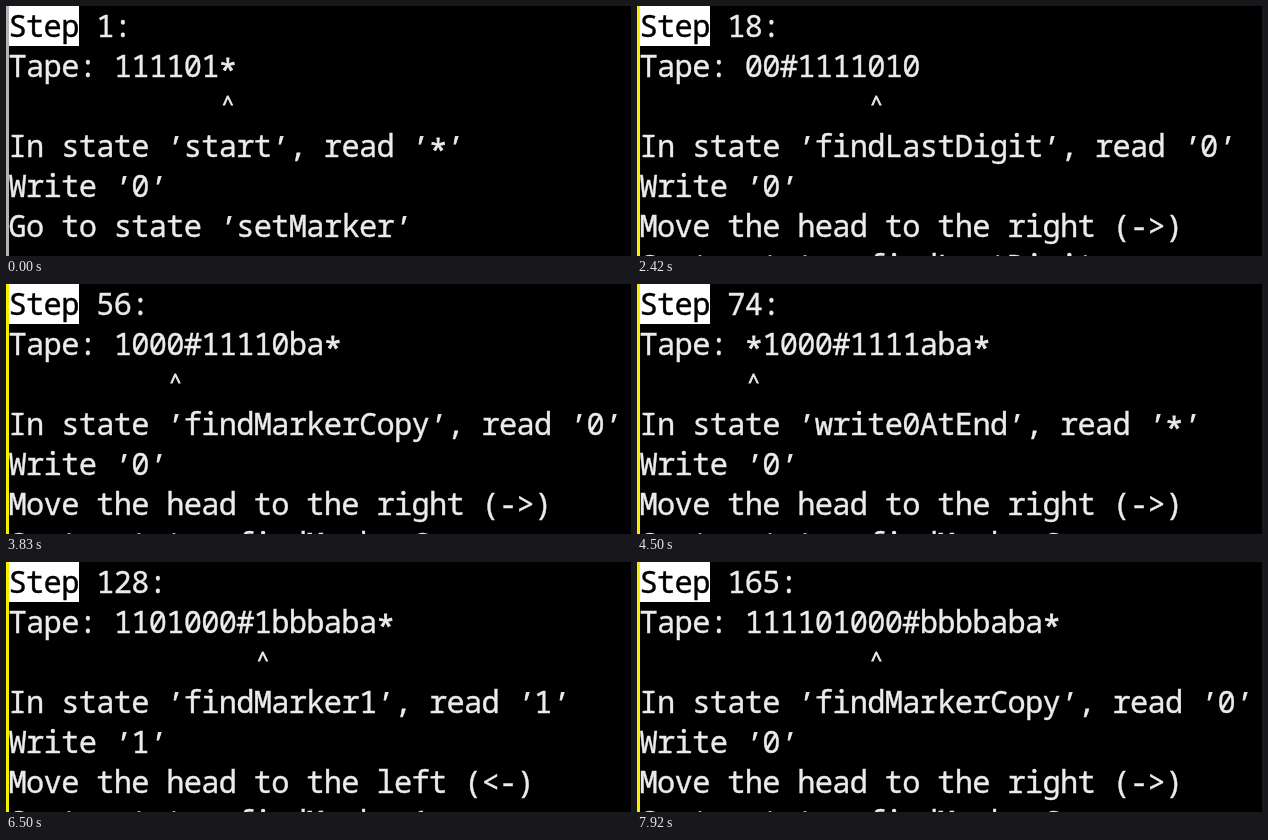
An HTML page for the animation above (8 s loop, 625 px wide and 250 px high).

```html
<!DOCTYPE html>
<html lang="en">
<head>
<meta charset="utf-8">
<title>Turing machine log</title>
<style>
  html, body { margin: 0; width: 100%; height: 100%; overflow: hidden; background: #000; }
  #screen { position: relative; width: 625px; height: 250px; overflow: hidden; background: #000; }
  #log, #caret { position: absolute; margin: 0; color: #ebebeb; font-family: "Noto Sans Mono", monospace; -webkit-text-stroke: 0.4px; }
  #log { left: 2.6px; top: 0; font-size: 30.4px; letter-spacing: -0.72px; line-height: 40px; white-space: pre; font-variant-ligatures: none; }
  #log mark { display: inline-block; height: 40px; vertical-align: top; background: #fff; color: #000; }
  #log i { display: inline-block; font-style: normal; transform: translate(-1px, 1px) skewX(-14deg); -webkit-text-stroke: 0.8px; }
  #log b { position: relative; top: 5px; font-weight: normal; -webkit-text-stroke: 0.8px; }
  #caret { top: 83px; width: 1ch; font-size: 19px; line-height: 28px; -webkit-text-stroke: 0.8px; }
  #edge { position: absolute; left: 0; top: 0; width: 2.5px; height: 250px; }
</style>
</head>
<body>
<div id="screen">
  <div id="edge"></div>
  <pre id="log"></pre>
  <div id="caret">^</div>
</div>
<script>
const LEFT = -1, RIGHT = 1, LOOP = 8000, FRAME = 1000 / 12, LAST_STEP = 165, CELL = 17.52;

// Each state: scan direction, then symbol -> [write, move, next state].
const toCopy = symbol => [symbol, LEFT, 'copy'];
const rules = {
  start: { '*': ['0', 0, 'setMarker'] },
  setMarker: { scan: LEFT, '*': ['#', LEFT, 'write0First'] },
  write0First: { '*': ['0', LEFT, 'write0Second'] },
  write0Second: { '*': ['0', RIGHT, 'findLastDigit'] },
  findLastDigit: { scan: RIGHT, '*': toCopy('*') },
  copy: { 0: ['a', LEFT, 'findMarker0'], 1: ['b', LEFT, 'findMarker1'] },
  findMarker0: { scan: LEFT, '#': ['#', LEFT, 'write0AtEnd'] },
  findMarker1: { scan: LEFT, '#': ['#', LEFT, 'write1AtEnd'] },
  write0AtEnd: { scan: LEFT, '*': ['0', RIGHT, 'findMarkerCopy'] },
  write1AtEnd: { scan: LEFT, '*': ['1', RIGHT, 'findMarkerCopy'] },
  findMarkerCopy: { scan: RIGHT, '#': ['#', RIGHT, 'findNextToCopy'] },
  findNextToCopy: { scan: RIGHT, a: toCopy('a'), b: toCopy('b'), '*': toCopy('*') }
};

function runMachine() {
  const tape = [...'111101*'], steps = [];
  let head = 6, state = 'start';
  while (steps.length < LAST_STEP) {
    if (head < 0) { tape.unshift('*'); head = 0; }
    if (head === tape.length) tape.push('*');
    const read = tape[head], rule = rules[state];
    const [write, move, next] = rule[read] || [read, rule.scan, state];
    steps.push({ tape: tape.join(''), head, state, read, write, move, next });
    tape[head] = write;
    head += move;
    state = next;
  }
  return steps;
}

function format(step, number) {
  const lines = [
    ` ${number}:`,
    `Tape: ${step.tape}`,
    '',
    `In state '${step.state}', read '${step.read}'`,
    `Write '${step.write}'`
  ];
  if (step.move) {
    lines.push(`Move the head to the ${step.move === LEFT ? 'left (<-)' : 'right (->)'}`);
  }
  lines.push(`Go to state '${step.next}'`);
  return '<mark>Step</mark>' + lines.join('\n')
    .replace(/</g, '&lt;')
    .replace(/'/g, "<i>'</i>")
    .replace(/\*/g, '<b>*</b>');
}

// One key press, a pause, then steady key repeat.
function stepAt(frame) {
  if (frame < 15) return 1;
  return Math.min(LAST_STEP, Math.max(2, Math.floor(2.2335 * frame - 46.2)));
}

const [log, caret, edge] = ['log', 'caret', 'edge'].map(id => document.getElementById(id));
const steps = runMachine();
let shown = 0;

function draw() {
  const frame = Math.floor((performance.now() % LOOP + 5) / FRAME);
  const number = stepAt(frame);
  edge.style.background = frame < 4 ? '#b4b4b4' : '#f6f000';
  if (number !== shown) {
    const step = steps[number - 1];
    log.innerHTML = format(step, number);
    caret.style.left = 6 + (6 + step.head) * CELL + 'px';
    shown = number;
  }
  requestAnimationFrame(draw);
}
draw();
</script>
</body>
</html>
```
